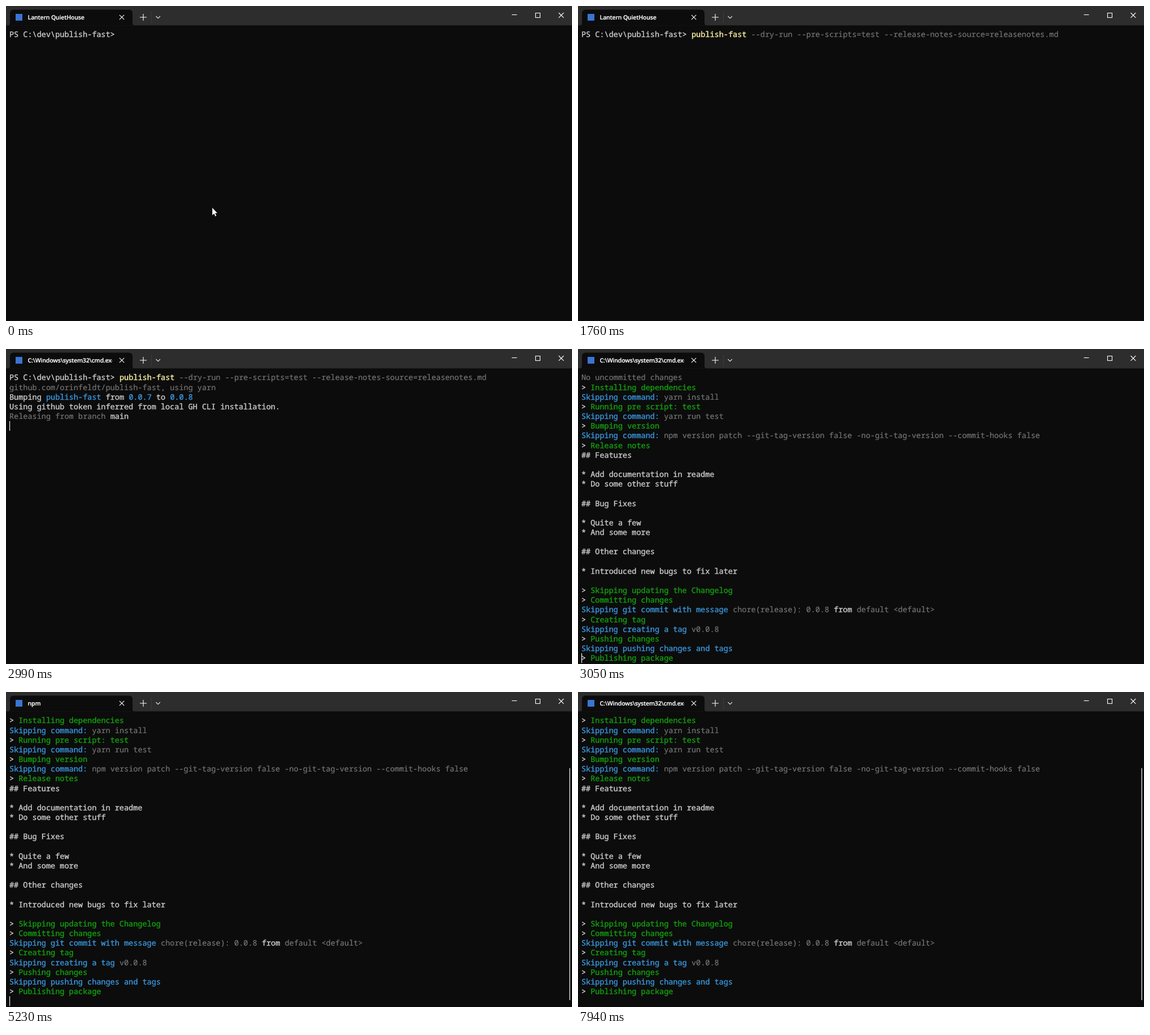
These frames come from a looping animation (1002x559 px, 8000 ms). An HTML page:

```html
<!DOCTYPE html>
<html lang="en">
<head>
<meta charset="utf-8">
<title>Terminal</title>
<style>
html, body { margin: 0; width: 100%; height: 100%; overflow: hidden; background: #0c0c0c; }
svg { display: block; width: 1002px; height: 559px; }
text { white-space: pre; text-rendering: geometricPrecision; }
.term { font: 500 13.542px "Noto Sans Mono", monospace; }
.title { font: 600 10.6px "Open Sans", sans-serif; letter-spacing: -0.2px; fill: #fff; stroke: #fff; stroke-width: .2; }
.icon { fill: none; stroke: #fff; stroke-width: 1.1; }
</style>
</head>
<body>
<svg viewBox="0 0 1002 559" xmlns="http://www.w3.org/2000/svg">
  <defs><clipPath id="titleClip"><rect x="36" y="8" width="151.5" height="24"/></clipPath></defs>
  <rect width="1002" height="559" fill="#0c0c0c"/>
  <g id="intro" class="term"></g>
  <g id="log" class="term"></g>
  <rect id="caret" width="1.1" height="17.2" fill="#fff"/>
  <rect id="scrollbar" x="997" y="135" width="2" height="412" rx="1" fill="#9d9d9d"/>

  <rect width="1002" height="34.4" fill="#2d2d2d"/>
  <path d="M3 34.4Q7 34.4 7 30.4V13Q7 6.5 13.5 6.5H217.5Q224 6.5 224 13V30.4Q224 34.4 228 34.4Z" fill="#0c0c0c"/>
  <rect x="17" y="14" width="12" height="12" fill="#3975d2"/>
  <text id="title" class="title" x="38.6" y="24.2" clip-path="url(#titleClip)"></text>
  <path d="M257.5 10V31" stroke="#3b3b3b"/>
  <g class="icon">
    <path d="M200.8 15.8L209.2 24.2M209.2 15.8L200.8 24.2"/>
    <path d="M237 20H249M243 14V26"/>
    <path d="M265.5 18.2L269.2 21.8L272.9 18.2"/>
    <path d="M895.5 15.5H904.5"/>
    <rect x="937.5" y="12.5" width="8" height="8"/>
    <path d="M978.5 12L987.3 20.8M987.3 12L978.5 20.8"/>
  </g>
  <path id="mouse" d="M0 0V14.3L3.3 11.2L5.4 16L7.7 15L5.6 10.3H9.6Z" fill="#fff" stroke="#000" stroke-width=".5"/>
</svg>
<script>
const LOOP = 8000, LEFT = 6, TOP = 42, CELL = 8.125, ROW = 17.17, BASE = 13.4;
const NS = "http://www.w3.org/2000/svg";
const $ = id => document.getElementById(id);

// A letter in braces sets the colour of the text after it.
const COLORS = { w: "#cccccc", d: "#767676", y: "#f9f1a5", b: "#3a96dd", g: "#13a10e" };

const step = name => "> {g}" + name;
const skip = command => "{b}Skipping command: {d}" + command;

const introLines = [
  "PS C:\\dev\\publish-fast> ",
  "{d}github.com/orinfeldt/publish-fast, using yarn",
  "Bumping {b}publish-fast{w} from {b}0.0.7{w} to {b}0.0.8",
  "Using github token inferred from local GH CLI installation.",
  "{d}Releasing from branch {w}main"
];
const command = "{y}publish-fast{d} --dry-run --pre-scripts=test --release-notes-source=releasenotes.md";

const logLines = [
  "{d}No uncommitted changes",
  step("Installing dependencies"),
  skip("yarn install"),
  step("Running pre script: test"),
  skip("yarn run test"),
  step("Bumping version"),
  skip("npm version patch --git-tag-version false -no-git-tag-version --commit-hooks false"),
  step("Release notes"),
  "## Features", "",
  "* Add documentation in readme",
  "* Do some other stuff", "",
  "## Bug Fixes", "",
  "* Quite a few",
  "* And some more", "",
  "## Other changes", "",
  "* Introduced new bugs to fix later", "",
  step("Skipping updating the Changelog"),
  step("Committing changes"),
  "{b}Skipping git commit with message {d}chore(release): 0.0.8{w} from {d}default <default>",
  step("Creating tag"),
  "{b}Skipping creating a tag {d}v0.0.8",
  step("Pushing changes"),
  "{b}Skipping pushing changes and tags",
  step("Publishing package")
];

function addLine(parent, line, row, col = 0) {
  const group = document.createElementNS(NS, "g");
  let color = "w";
  for (const part of line.split(/(\{\w\})/)) {
    if (/^\{\w\}$/.test(part)) { color = part[1]; continue; }
    if (!part) continue;
    const text = document.createElementNS(NS, "text");
    text.setAttribute("x", LEFT + col * CELL);
    text.setAttribute("y", TOP + row * ROW + BASE);
    text.setAttribute("fill", COLORS[color]);
    text.setAttribute("stroke", COLORS[color]);
    text.setAttribute("stroke-width", color === "d" ? 0.2 : 0.4);
    text.textContent = part;
    group.append(text);
    col += part.length;
  }
  parent.append(group);
  return group;
}

const introRows = introLines.map((line, row) => addLine($("intro"), line, row));
const commandRow = addLine($("intro"), command, 0, 24);
const logRows = logLines.map((line, row) => addLine($("log"), line, row));

const shell = "C:\\Windows\\system32\\cmd.exe";
const titles = [
  [0, "Lantern QuietHouse"], [2000, shell], [3230, "npm"], [4270, "npm show"],
  [4390, "npm"], [5440, "npm show"], [5560, shell]
];
const rowCounts = [[0, 1], [2430, 2], [2490, 3], [2580, 4], [2990, 5]];

// [time, row, column]; an entry without a row hides the caret.
const carets = [
  [0], [150, 0, 24], [710], [1200, 0, 104], [1760], [1880, 1, 0],
  [2430, 2, 0], [2490, 3, 0], [2580, 4, 0], [2990, 5, 0], [3050, 29, 0],
  [3570], [4090, 29, 0], [4640], [5230, 29, 0], [5740], [6260, 29, 0],
  [6850], [7370, 29, 0], [7940]
];

const latest = (list, t) => list.findLast(entry => entry[0] <= t);
const show = (node, on) => node.setAttribute("visibility", on ? "visible" : "hidden");

function drawMouse(t) {
  const tick = t < 860 ? 0 : Math.floor((t - 860) / 68) + 1;
  const p = (Math.min(tick, 5) / 5) ** 1.5;
  show($("mouse"), t < 1200);
  $("mouse").setAttribute("transform", `translate(${365 + 588 * p} ${357.5 + 88 * p})`);
}

function draw(t) {
  const logging = t >= 3050, scrolled = t >= 3140;
  const count = latest(rowCounts, t)[1];
  introRows.forEach((row, i) => show(row, !logging && i < count));
  show(commandRow, !logging && t >= 710);
  logRows.forEach((row, i) => show(row, logging && !(scrolled && i === 0)));
  $("log").setAttribute("transform", `translate(0 ${scrolled ? -ROW : 0})`);
  show($("scrollbar"), scrolled);

  const title = latest(titles, t)[1];
  if ($("title").textContent !== title) $("title").textContent = title;

  const [, row, col] = latest(carets, t);
  show($("caret"), row !== undefined);
  if (row !== undefined) {
    $("caret").setAttribute("x", LEFT + col * CELL);
    $("caret").setAttribute("y", TOP + row * ROW);
  }
  drawMouse(t);
}

const start = performance.now();
function frame() {
  draw((performance.now() - start) % LOOP);
  requestAnimationFrame(frame);
}
frame();
</script>
</body>
</html>
```
